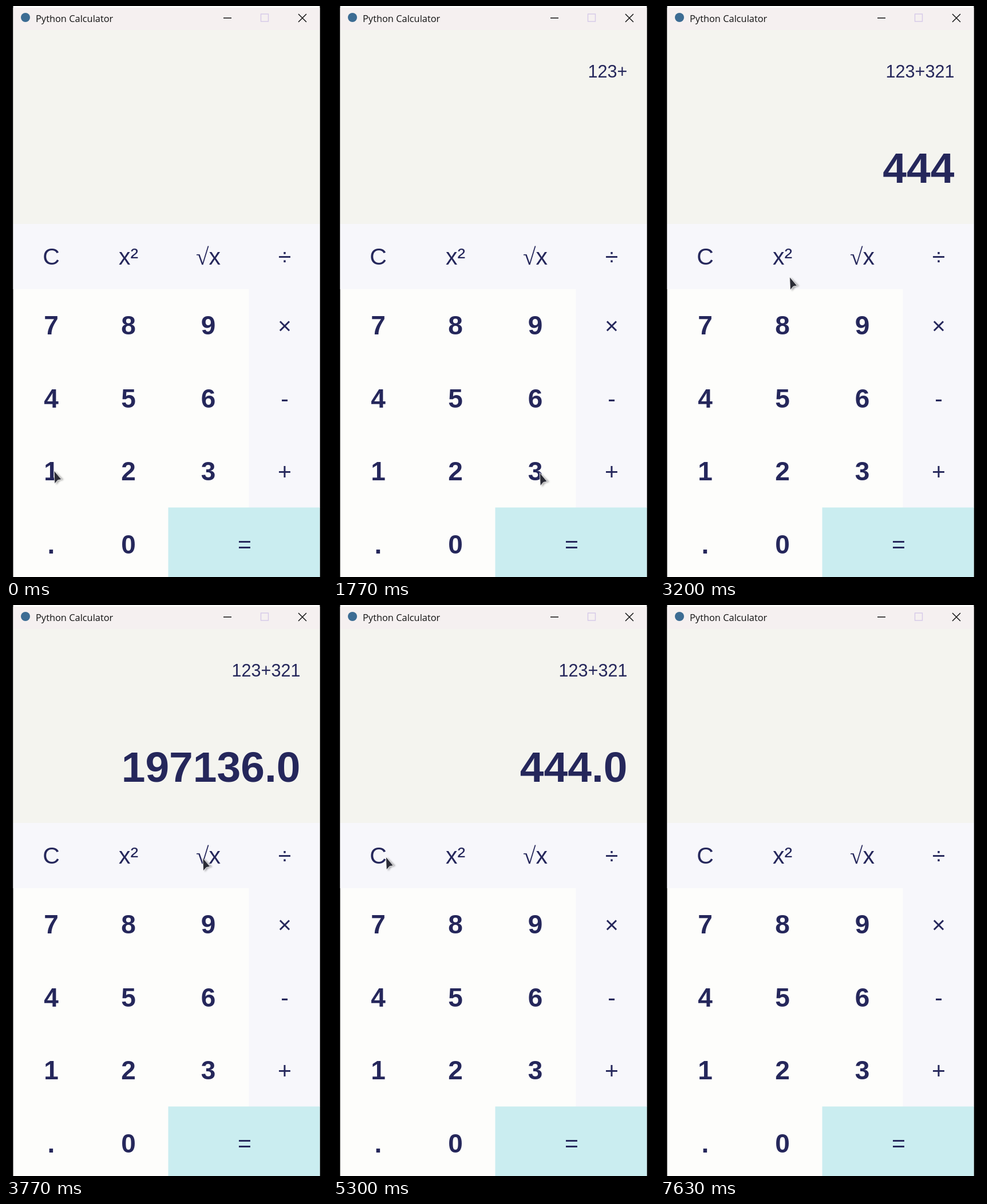
These frames come from a looping animation (561x998 px, 7660 ms). An HTML page:

```html
<!DOCTYPE html>
<html lang="en">
<head>
<meta charset="utf-8">
<title>Python Calculator</title>
<style>
  html, body { margin: 0; width: 100%; height: 100%; overflow: hidden; background: #000; }
  svg { display: block; width: 561px; height: 998px; }
  text { font-family: "Liberation Sans", Arial, sans-serif; fill: #25275b; }
  .title { font: 16.4px "Open Sans", sans-serif; fill: #111; }
  .op { font-size: 41px; text-anchor: middle; }
  .num { font-size: 46px; font-weight: bold; text-anchor: middle; }
  .root { font-family: "Liberation Serif", serif; }
  #total { font-size: 30.6px; text-anchor: end; }
  #value { font-size: 75px; font-weight: bold; text-anchor: end; }
</style>
</head>
<body>
<svg viewBox="0 0 561 998">
  <defs>
    <clipPath id="window"><rect x="12.5" width="536" height="998"/></clipPath>
    <filter id="soft" x="-50%" y="-50%" width="200%" height="200%"><feGaussianBlur stdDeviation="1.8"/></filter>
  </defs>
  <rect width="561" height="998"/>
  <g clip-path="url(#window)">
    <rect x="12" width="537" height="998" fill="#fdfdfb"/>
    <rect x="12" y="3" width="537" height="39" fill="#f5f0f0"/>
    <rect x="12" y="42" width="537" height="339" fill="#f4f4ef"/>
    <path d="M12 381H549V877H424.5V495H12Z" fill="#f7f7fb"/>
    <rect x="283.5" y="876.5" width="266" height="122" fill="#caedf0"/>

    <circle cx="34" cy="20" r="8" fill="#3c6c93"/>
    <text class="title" x="52" y="27.5">Python Calculator</text>
    <g fill="none" stroke="#1c1c1c" stroke-width="1.6">
      <path d="M380 21H394"/>
      <rect x="445.5" y="14" width="13" height="13" stroke="#d5c9e8" stroke-width="1.4"/>
      <path d="M511 14L525 28M525 14L511 28"/>
    </g>

    <text id="total" x="514.5" y="125"></text>
    <text id="value" x="514.5" y="309"></text>
    <g id="keys"></g>

    <g id="pointer">
      <path d="M2 3L17 18L10 20L4 27Z" opacity=".3" filter="url(#soft)"/>
      <path d="M0 2L13 17.5L6.5 18.7L1 25Z" fill="#2b2c36" stroke="#fff" stroke-opacity=".8" stroke-linejoin="round"/>
    </g>
  </g>
</svg>
<script>
const LOOP = 7660, MOVE = 300, LEAVE = 5970;
const $ = id => document.getElementById(id);
const mix = (a, b, k) => ({ x: a.x + (b.x - a.x) * k, y: a.y + (b.y - a.y) * k });

// Keypad
const keys = {};
const columns = [79, 214, 353.5, 487];

function addKey(label, x, y) {
  const isNum = /[\d.]$/.test(label);
  const el = document.createElementNS("http://www.w3.org/2000/svg", "text");
  el.setAttribute("class", isNum ? "num" : "op");
  el.setAttribute("x", x);
  el.setAttribute("y", y + (isNum ? 15.5 : 14));
  el.innerHTML = label.replace("√", '<tspan class="root">√</tspan>');
  $("keys").append(el);
  keys[label] = { x, y };
}

["C x² √x ÷", "7 8 9 ×", "4 5 6 -", "1 2 3 +", ". 0"].forEach((row, r) => {
  const y = r ? 558.5 + 127.6 * (r - 1) : 438;
  row.split(" ").forEach((label, c) => addKey(label, columns[c], y));
});
addKey("=", 417, 940.5);

// Calculator
function press({ total, value }, key) {
  switch (key) {
    case "C": return { total: "", value: "" };
    case "+": return { total: value + "+", value: "" };
    case "=": return { total: total + value, value: String(parseFloat(total) + Number(value)) };
    case "x²": return { total, value: (value ** 2).toFixed(1) };
    case "√x": return { total, value: Math.sqrt(value).toFixed(1) };
    default: return { total, value: value + key };
  }
}

// Steady typing, then three slower clicks
const clicks = [..."123+321="].map((key, i) => ({ key, at: 460 + 360 * i }));
clicks.push({ key: "x²", at: 3560 }, { key: "√x", at: 4440 }, { key: "C", at: 5600 });

// Each move begins after a click and stops slightly short of the next key
const steps = [{ at: 0, total: "", value: "", spot: { x: 84, y: 810 } }];
for (const { key, at } of clicks) {
  const last = steps.at(-1);
  steps.push({ at, ...press(last, key), spot: mix(last.spot, keys[key], 0.95) });
}

function pointerAt(t, i) {
  const from = steps[i].spot;
  const next = steps[i + 1];
  const to = next ? next.spot : { x: -30, y: from.y };
  const u = Math.min(Math.max((t - (next ? steps[i].at : LEAVE)) / MOVE, 0), 1);
  return mix(from, to, 1 - (1 - u) ** 3);
}

function draw(t) {
  const i = steps.findLastIndex(s => s.at <= t);
  $("total").textContent = steps[i].total;
  $("value").textContent = steps[i].value;
  const { x, y } = pointerAt(t, i);
  $("pointer").setAttribute("transform", `translate(${x} ${y})`);
}

const start = performance.now();
function tick() {
  draw((performance.now() - start) % LOOP);
  requestAnimationFrame(tick);
}
tick();
</script>
</body>
</html>
```
